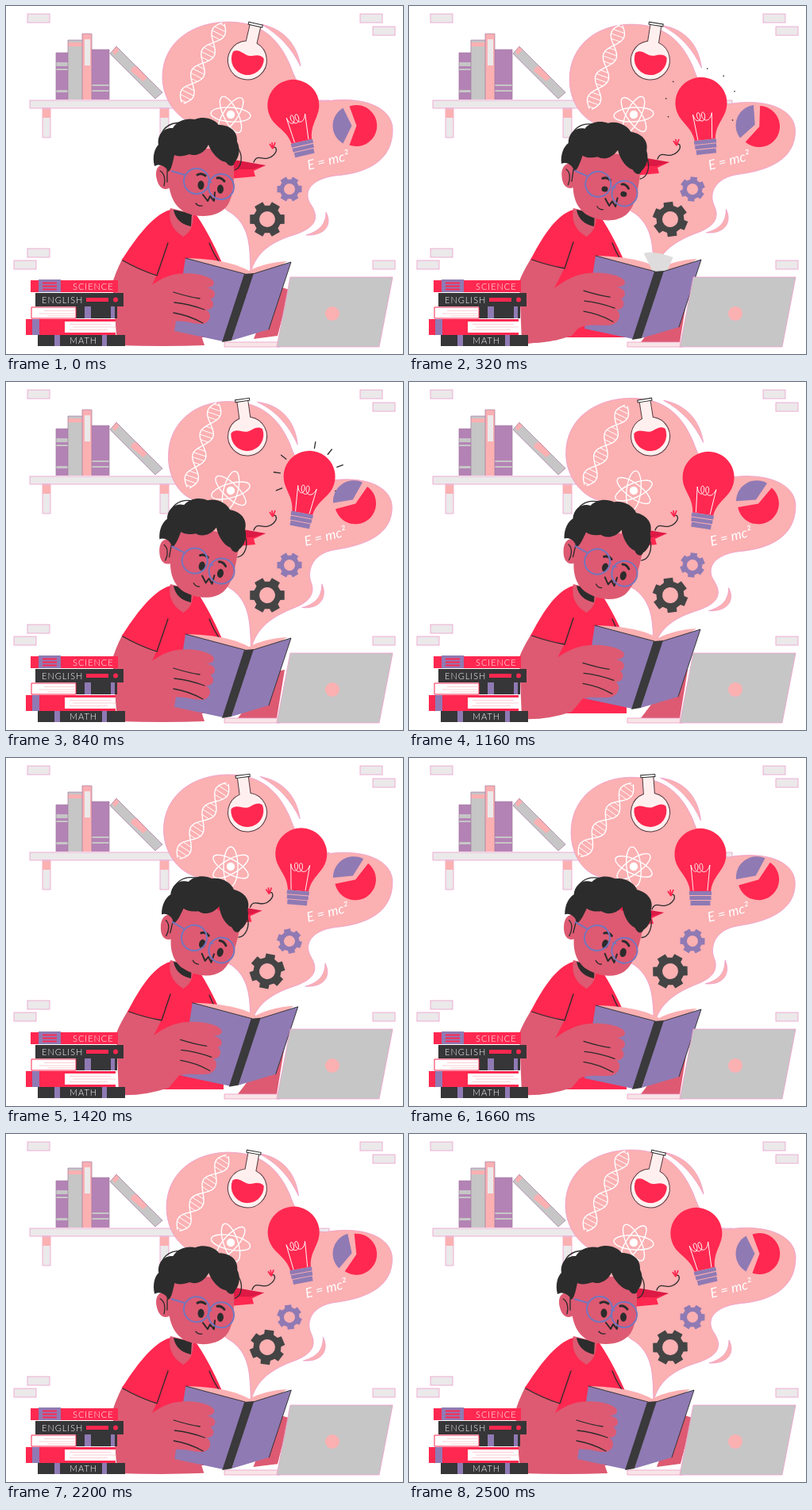
Write an HTML page that moves like this. It is 500 by 439 pixels and loops after 2.52 s.

```html
<!DOCTYPE html>
<html lang="en">
<head>
<meta charset="utf-8">
<title>Reading student</title>
<style>
html, body { margin: 0; width: 100%; height: 100%; overflow: hidden; background: #fff }
svg { display: block; width: 100vw; height: 100vh }
.red { fill: #ff2850 } .skin { fill: #dd5a72 } .dark { fill: #2c2c2c } .violet { fill: #8f7ab4 }
.pink { fill: #fbb0b2 } .grey { fill: #c6c6c6 } .mauve { fill: #b483b5 } .pale { fill: #ebe9ea }
.white { fill: #fff }
.ink { fill: none; stroke: #2c2c2c; stroke-width: 1.3; stroke-linecap: round; stroke-linejoin: round }
.chalk { fill: none; stroke: #fff; stroke-width: 1.4; stroke-linecap: round }
.thin { stroke-width: .9 } .thick { stroke-width: 2 } .brow { stroke-width: 3 }
.edge { stroke: #ee9ccb; stroke-width: .8 }
text { font-family: Lato, sans-serif; fill: #fff }
</style>
</head>
<body>
<svg viewBox="0 0 500 439" preserveAspectRatio="none">
  <g id="bricks" class="pale edge"></g>
  <g id="shelf">
    <path class="pale edge" d="M30 119H407V129H30zM46 129H56V166H46zM194 129H205V166H194z"/>
    <path class="pink" d="M46 130H56V141H46zM194 130H205V141H194z"/>
    <path class="mauve" d="M63 59H78V118H63zM108 55H130V118H108z"/>
    <path class="grey" d="M78 43H96V118H78zM63 71H78V76H63zM63 79H78V81H63zM63 106H78V109H63zM108 99H130V101H108zM108 106H130V108H108zM131 60L139 51L197 109L188 117z"/>
    <path class="pink" d="M96 35H108V118H96zM78 46H96V51H78zM134 57L139 51L143 55L137 62zM159 77L165 76L178 90L173 95L157 82z"/>
    <path class="pale" d="M99 42H106V75H99z"/>
    <path d="M131 60L139 51L197 109L188 117zM63 118V59H78V43H96V35H108V55H130V118M78 59V118M96 43V118M108 55V118" fill="none" stroke="#a2789f" stroke-width=".7"/>
  </g>

  <path id="blob" class="pink edge"/>
  <path id="topArc" class="pink edge"/>
  <path id="lowArc" class="pink edge"/>
  <g id="dna" class="chalk"></g>

  <g id="flask">
    <path fill="#fff0ef" stroke="#55393f" d="M-7 -45H7V-23A24.500 24.500 0 1 1 -7 -23z"/>
    <path class="red" d="M-20 -6C-12 -13 -5 -3 4 -6C11 -9 16 -10 20 -6A20.500 20.500 0 1 1 -20 -6z"/>
    <path fill="#fff" stroke="#2c2c2c" d="M-9 -47H9V-44H-9z"/>
  </g>

  <g id="atom" class="chalk"></g>

  <g id="bulb">
    <path class="red" d="M-29 14A32.500 32.500 0 1 1 29 14C23 25 15 31 13 46H-13C-15 31 -23 25 -29 14z"/>
    <path class="violet" d="M-14 46H14V51H-14zM-13.500 52H13.500V57H-13.500zM-12.500 58H12.500V64H-12.500z"/>
    <path class="chalk thin" d="M-9 45L-12 13C-10 23 -3 24 -3 16C-3 9 -8 10 -7 16C-5 24 3 24 3 16C3 9 -2 10 -1 16C1 24 9 24 12 13L9 45"/>
  </g>
  <path id="rays" class="ink"/>

  <g id="pie">
    <path class="red" d="M3 0L-6 -24.500A26 26 0 1 1 -6 24.500z"/>
    <path class="violet" d="M-3 0L-14 -22.500A26 26 0 0 0 -14 22.500z"/>
  </g>
  <text id="formula" font-size="17" font-style="italic">E = mc²</text>
  <path id="bigGear" fill="#444" fill-rule="evenodd"/>
  <path id="smallGear" class="violet" fill-rule="evenodd"/>

  <g id="cap">
    <path class="red" d="M270 196L327 201L312 208L314 215L270 219z"/>
    <path fill="#dc1a45" d="M270 192L293 195L327 201L311 206L280 206z"/>
    <path class="ink" d="M312 197C317 184 326 199 337 188C343 182 340 176 336 179"/>
    <path d="M336 180L332 174M336 180L335 172M336 180L339 172" stroke="#ff2850" stroke-width="1.800"/>
  </g>

  <path id="farArm" class="skin"/>
  <path class="red" d="M206 258C186 268 175 290 180 325L178 418H274L274 328C265 308 255 286 240 264z"/>
  <path class="ink" d="M256 299Q262 314 270 325"/>
  <path class="skin" d="M207 255C203 270 210 286 223 291C232 286 236 278 236 262z"/>
  <path class="dark" d="M211 257C213 269 222 276 233 278L234 262z"/>

  <path id="arm" class="skin"/>
  <path id="sleeve" class="red"/>
  <path id="fold" class="ink"/>

  <g id="head">
    <path class="skin" d="M205 180L204 214C205 240 213 254 227 261C245 268 266 266 277 254C288 241 288 215 286 180z"/>
    <path class="skin" d="M206 203C194 196 186 204 190 219C193 231 201 234 208 228z"/>
    <path class="ink" d="M194 208C200 211 201 220 199 227"/>
    <path class="dark" d="M187 202C184 190 187 180 192 175C190 162 199 153 210 154C216 144 228 141 238 143C250 138 263 143 268 150C283 150 292 159 291 171C296 181 293 192 288 197C287 203 281 203 277 197C267 195 259 185 255 175C249 187 238 190 231 187C223 190 216 190 212 188C210 198 208 208 204 209C202 202 193 198 187 202z"/>
    <path class="ink" d="M193 172C195 153 207 147 221 147M292 179C299 189 297 204 288 207M203 207V222"/>
    <g id="eyes" class="dark"><ellipse cx="245.500" rx="4" ry="5.700"/><ellipse cx="270" cy="5" rx="4" ry="5.700"/></g>
    <path class="ink brow" d="M241 213Q246 210 251 214M266 217Q271 216 275 221"/>
    <path class="ink thick" d="M248 238L254 246L257 240L262 246L263 235"/>
    <path class="ink" d="M239 249Q242 253 247 252"/>
    <g fill="none" stroke="#7476bd" stroke-width="2">
      <g id="leftLens"><circle cx="240" cy="221" r="16"/><path d="M208 208L225 213"/></g>
      <circle cx="271" cy="228" r="16"/><path d="M254 223Q257 221 259 223"/>
    </g>
  </g>

  <path class="edge" fill="#f8e4e6" d="M275 424H345V430H275z"/>
  <g id="book">
    <path class="pink" d="M228 318C255 319 285 322 306 334C320 327 335 323 354 322L312 350z"/>
    <path id="page" fill="#dedcdd"/>
    <path class="violet" d="M226 318L301 338L273 423L212 410zM311 338L359 323L331 408L284 422z"/>
    <path class="ink thin" d="M226 318L301 338M311 338L359 323L331 408"/>
    <path fill="#3a393b" d="M300 338L312 337L284 422L272 424z"/>
  </g>
  <path id="hand" class="skin"/>
  <path id="fingers" class="ink"/>
  <path class="grey edge" d="M358 342H487L470 430H341z"/>
  <circle class="pink" cx="411" cy="388" r="9"/>

  <g id="stack">
    <path class="red" d="M31 346H141V361H31zM25 395H138V415H25z"/>
    <path fill="#363537" d="M37 362H148V379H37zM88 379H140V394H88zM40 415H150V429H40z"/>
    <path class="violet" d="M41 345H69V361H41zM99 379H107V394H99zM132 379H137V394H132zM33 395H42V415H33zM61 415H68V429H61zM121 415H127V429H121z"/>
    <path class="white" stroke="#ff2850" d="M88 380H32V394H88z"/>
    <path class="white" d="M74 398H138V412H74z"/>
    <path d="M46 349.500H64M46 353.500H64M46 357.500H64" stroke="#ff2850" stroke-width="2"/>
    <path d="M101 370.500H129" stroke="#ff2850" stroke-width="5"/>
    <circle class="red" cx="138" cy="370.500" r="3"/>
    <path d="M48 384.500H88M42 388H88M52 391H88M80 401.500H132M84 405H138M80 408.500H128" stroke="#f8c5cc" stroke-width=".8"/>
    <g font-size="11" font-weight="300" letter-spacing="1"><text x="84" y="358">SCIENCE</text><text x="45" y="374.500">ENGLISH</text><text x="80" y="426">MATH</text></g>
  </g>
</svg>
<script>
const LOOP = 2520;
const KEYS = [0, 320, 840, 1160, 1660, 1920];
const BULB = { x: [362, 368, 382, 377, 367, 363], y: [126, 123, 120, 121, 122, 123] };
const RAYS = [-142, -172, 158, -80, -51, -20, 28];
const $ = id => document.getElementById(id);
const setPath = (id, d) => $(id).setAttribute('d', d);
const place = (id, x, y, angle = 0) => $(id).setAttribute('transform', `translate(${x} ${y}) rotate(${angle})`);
const clamp = x => Math.min(1, Math.max(0, x));

// Smooth periodic track through one value per key time, without overshoot.
function track(t, values) {
  const n = KEYS.length, wrap = i => (i + n) % n;
  const span = i => (wrap(i) === n - 1 ? LOOP : KEYS[wrap(i) + 1]) - KEYS[wrap(i)];
  const slope = i => (values[wrap(i + 1)] - values[wrap(i)]) / span(i);
  const tangent = i => {
    const a = slope(i - 1), b = slope(i);
    return a * b <= 0 ? 0 : 2 * a * b / (a + b);
  };
  let i = n - 1;
  while (KEYS[i] > t) i--;
  const h = span(i), s = (t - KEYS[i]) / h, r = 1 - s;
  return values[i] * r * r * (1 + 2 * s) + values[wrap(i + 1)] * s * s * (3 - 2 * s)
    + h * s * r * (tangent(i) * r - tangent(i + 1) * s);
}

// Blend two path strings that share the same commands.
function mix(a, b, k) {
  const ends = b.match(/-?[\d.]+/g);
  let i = 0;
  return a.replace(/-?[\d.]+/g, n => (+n + (ends[i++] - n) * k).toFixed(2));
}

function gear(radius, hole) {
  const points = [];
  for (let tooth = 0; tooth < 6; tooth++)
    for (const [offset, r] of [[-20, .78], [-15, 1], [15, 1], [20, .78]]) {
      const a = (tooth * 60 + offset) * Math.PI / 180;
      points.push([radius * r * Math.cos(a), radius * r * Math.sin(a)]);
    }
  return `M${points.join('L')}zM${hole} 0A${hole} ${hole} 0 1 0 ${-hole} 0A${hole} ${hole} 0 1 0 ${hole} 0z`;
}

function helix() {
  const strands = [[], []];
  let rungs = '';
  for (let y = -56; y <= 56; y += 2) {
    const x = 8.5 * Math.sin(y * Math.PI / 29);
    strands[0].push([x, y]);
    strands[1].push([-x, y]);
    if (y % 6 === 0) rungs += `M${-x} ${y}H${x}`;
  }
  return `<path d="M${strands[0].join('L')}M${strands[1].join('L')}"/><path class="thin" d="${rungs}"/>`;
}

$('bricks').innerHTML = [[27, 10], [446, 10], [462, 26], [27, 306], [10, 321], [462, 321]]
  .map(([x, y]) => `<rect x="${x}" y="${y}" width="28" height="11"/>`).join('');
$('atom').innerHTML = [0, 60, 120].map(a => `<ellipse rx="25" ry="9" transform="rotate(${a})"/>`).join('')
  + '<circle r="4.500" fill="#fff"/>';
$('dna').innerHTML = helix();
setPath('bigGear', gear(22.5, 10));
setPath('smallGear', gear(16, 7));

function drawCloud(t) {
  const sway = (1 - Math.cos(4 * Math.PI * t / LOOP)) / 2;
  setPath('blob', mix(
    'M197 90C197 45 236 20 280 20C325 20 345 45 358 75C368 103 380 121 403 120C450 113 487 128 487 156C487 195 455 211 415 214C385 218 372 234 385 252C396 270 387 280 365 288C335 297 315 310 308 337C307 305 308 280 285 262C260 250 240 200 240 150C213 142 197 115 197 90z',
    'M207 96C207 52 240 26 280 26C322 26 344 48 357 78C367 106 380 127 403 127C450 118 486 132 486 159C486 190 455 204 413 211C390 215 382 234 383 250C390 268 377 278 362 284C335 296 315 310 309 337C307 305 308 280 285 262C260 250 240 200 240 150C218 144 207 120 207 96z', sway));
  setPath('topArc', mix('M321 23C351 29 367 50 371 76C360 54 345 36 321 23z', 'M315 26C348 29 364 53 366 80C356 57 340 37 315 26z', sway));
  setPath('lowArc', mix('M403 260C411 275 403 290 378 289C394 284 403 276 403 260z', 'M396 253C403 268 395 286 371 283C388 279 396 270 396 253z', sway));
  place('formula', 381 - 5 * sway, 207, -14);
  place('dna', 248, track(t, [72, 77, 80, 80, 78, 77]), track(t, [27, 20, 19, 27, 36, 36]));
  place('flask', 304, 68, track(t, [13, 9, -8, -9, -4, 5]));
  place('atom', 283, 137, 4 - 60 * t / LOOP);
  place('pie', 438.5, 151, track(t, [0, 22, 55, 60, 54, 35]));
  place('bigGear', 329, 269, 60 * t / 840);
  place('smallGear', 357, 231, -60 * t / 840);
}

function drawBulb(t) {
  const x = track(t, BULB.x), y = track(t, BULB.y);
  place('bulb', x, y, track(t, [-13, -6, 11, 8.5, 0, -7]));
  const length = 8 * clamp((t - 300) / 300) * clamp((1120 - t) / 200);
  setPath('rays', length <= 0 ? '' : RAYS.map(deg => {
    const a = deg * Math.PI / 180;
    const point = r => `${x + r * Math.cos(a)} ${y + r * Math.sin(a)}`;
    return `M${point(45)}L${point(45 - length)}`;
  }).join(''));
}

function drawStudent(t) {
  const tilt = track(t, [0, 8, 10, 13, 14, 1]);
  $('head').setAttribute('transform', `translate(${tilt / 14} ${tilt * 6 / 14}) rotate(${tilt} 235 230)`);
  $('eyes').setAttribute('transform', `translate(0 226) scale(1 ${track(t, [1, .6, 1, 1, 1, 1])})`);
  place('leftLens', -.45 * tilt, 0);
  place('cap', track(t, [0, 1, 0, -2, -6, -4]), track(t, [0, -4, -10, -10, -6, -2]));

  const reach = track(t, [0, 1, 0, 1, 1, .05]);
  const dx = track(t, [0, 9, 0, 8, 9, 1]), dy = track(t, [0, -3, 0, -11, -6, 0]);
  setPath('sleeve', mix(
    'M207 257C183 264 162 296 146 320Q166 333 190 340L204 345L222 290C210 283 204 270 207 257z',
    'M207 257C183 264 166 296 153 320Q174 327 196 331L204 340L222 290C210 283 204 270 207 257z', reach));
  setPath('fold', mix('M147 321Q168 333 190 340L204 299', 'M155 320Q174 327 196 331L207 298', reach));
  setPath('arm', mix(
    'M147 318Q137 338 134 350L140 428Q200 430 250 428L240 398L190 390L180 362L190 338z',
    'M154 318Q143 336 139 347L142 425Q172 427 205 416L220 398L190 385L182 358L196 330z', reach));
  setPath('farArm', mix('M338 352L357 358L342 416L312 420z', 'M336 366L351 363L341 424L292 424z',
    track(t, [0, 1, 1, 1, 1, .1])));

  place('book', dx, dy);
  place('hand', dx, dy * .6);
  place('fingers', dx, dy * .6);
  setPath('hand', mix(
    'M150 378C175 362 190 341 216 338C238 335 263 342 262 350C261 356 250 355 254 356C264 357 267 367 257 370C264 373 262 384 252 383C260 388 258 399 248 401C237 402 226 396 211 398L196 428L146 425z',
    'M141 384C168 364 186 343 214 339C238 336 264 343 263 351C262 357 250 356 254 357C264 358 266 368 258 371C264 375 262 385 252 385C260 389 256 402 246 404C234 406 222 402 207 407L178 423L138 428z', reach));
  setPath('fingers', 'M211 361Q230 367 244 369M212 374Q231 376 250 383M211 387Q230 390 248 400');

  const flip = (t - 150) / 350;
  if (flip <= 0 || flip >= 1) return setPath('page', '');
  const x = 305 + 45 * Math.cos(Math.PI * flip), y = 325 - 12 * Math.sin(Math.PI * flip);
  setPath('page', `M298 338L${x - 20} ${y + 2}Q${x - 10} ${y - 2} ${x + 17} ${y + 7}L316 338z`);
}

function draw(now) {
  const t = now % LOOP;
  drawCloud(t);
  drawBulb(t);
  drawStudent(t);
  requestAnimationFrame(draw);
}
draw(0);
</script>
</body>
</html>
```
